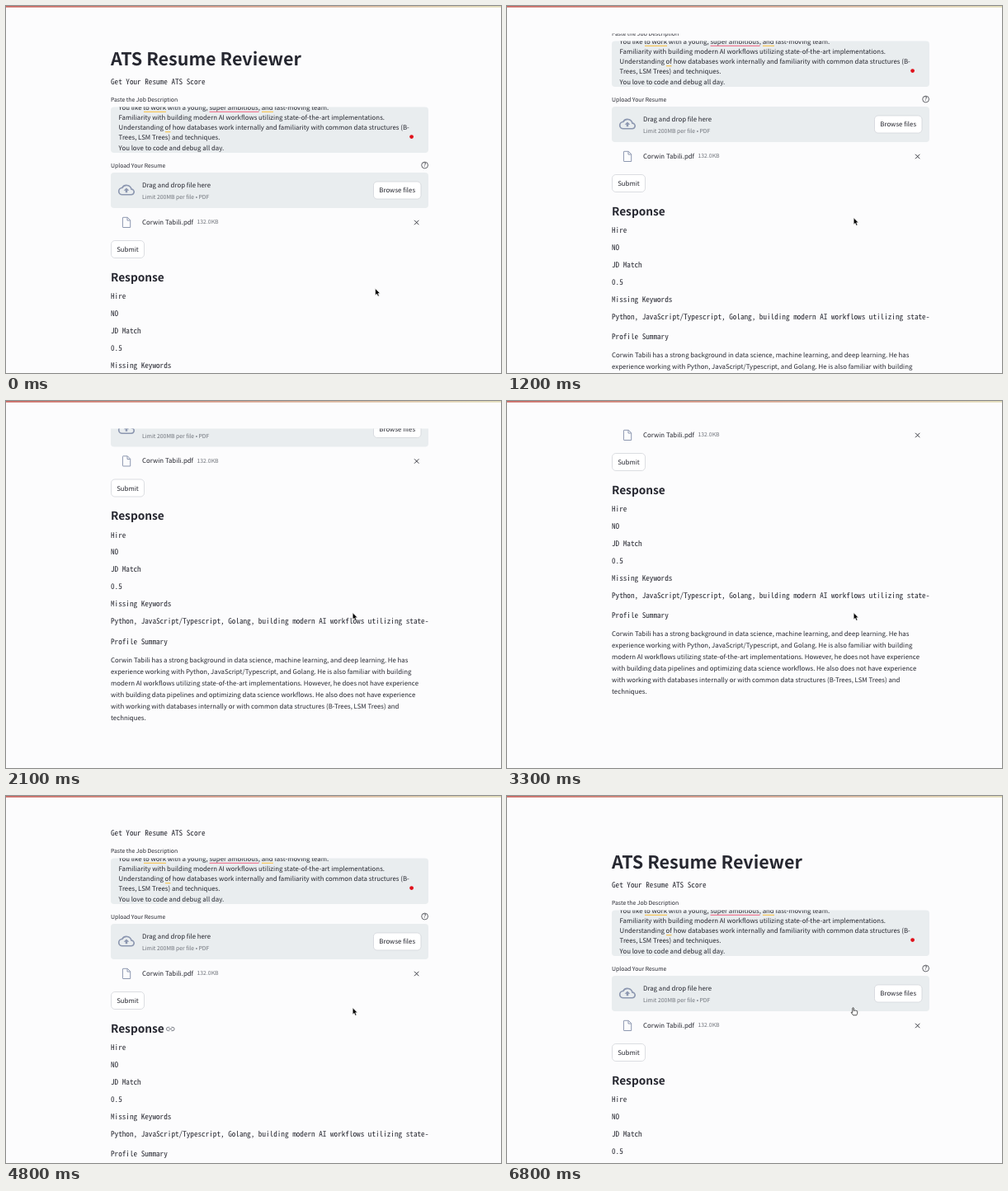
Recreate the animation shown at these times as an HTML page. Size 600 px wide and 445 px high, loop 6.9 s.

```html
<!DOCTYPE html>
<html lang="en">
<head>
<meta charset="utf-8">
<title>ATS Resume Reviewer</title>
<style>
html, body { margin: 0; height: 100%; overflow: hidden; background: #fcfcfd; }
svg { display: block; width: 600px; height: 445px; }
text { font: 7.83px "Noto Sans CJK JP", "Noto Sans", sans-serif; fill: #262730; text-rendering: geometricPrecision; white-space: pre; }
.h1 { font-size: 21.5px; font-weight: 700; }
.h2 { font-size: 13.7px; font-weight: 700; }
.small { font-size: 6.86px; }
.grey { font-size: 6.86px; fill: #70747c; }
.mid { text-anchor: middle; }
.mono { font: 9.18px "Noto Sans Mono CJK JP", "Noto Sans Mono", monospace; }
.box { fill: #e9edef; }
.btn { fill: #fff; stroke: #cdd0d6; stroke-width: .7; }
.line { fill: none; stroke: #262730; stroke-width: .9; }
.icon { fill: none; stroke: #8c97b0; }
</style>
</head>
<body>
<svg viewBox="0 0 600 445">
  <defs>
    <linearGradient id="bar"><stop stop-color="#c9655f"/><stop offset="1" stop-color="#e2dcb8"/></linearGradient>
    <clipPath id="view"><path d="M0 33.5H600V445H0z"/></clipPath>
    <clipPath id="area"><rect x="127" y="122.5" width="385" height="55.5" rx="4"/></clipPath>
  </defs>
  <rect width="600" height="1.7" fill="url(#bar)"/>
  <g clip-path="url(#view)"><g id="page">
    <rect class="box" x="127" y="122.5" width="385" height="55.5" rx="4"/>
    <g id="job" clip-path="url(#area)">
      <path d="M167 128.3h27M310 128.3h14M193 152.6h6.5" stroke="#f5c65d" stroke-width="1.2"/>
      <path d="M246.500 128.3h60" stroke="#f07c95" stroke-width="1.2"/>
    </g>
    <circle cx="491.600" cy="158.600" r="2.400" fill="#e0101a"/>
    <circle class="line" cx="507.600" cy="193" r="3.900" style="stroke-width:.7"/>
    <rect class="box" x="127" y="202" width="385" height="43" rx="4"/>
    <g transform="translate(136 213) scale(.83)">
      <path class="icon" stroke-width="2" d="M6 19h13a4 4 0 0 0 .3-8 7.400 7.400 0 0 0-13.600-2A5 5 0 0 0 6 19z"/>
      <path d="M8 13h2.500v3h3v-3H16l-4-4z" fill="#8c97b0"/>
    </g>
    <rect class="btn" x="445.500" y="213" width="57.500" height="21" rx="4.400"/>
    <path class="icon" d="M142 256.300h5.300l3.400 3.400v8.800h-8.700q-.6 0-.6-.6v-11q0-.6.600-.6zM147 256.500v3.500h3.500"/>
    <path class="line" d="M495 259.800l5.400 5.400m0-5.400l-5.400 5.400"/>
    <rect class="btn" x="127.500" y="284.500" width="40" height="21" rx="4.400"/>
    <g id="link" class="icon" style="stroke:#777b84" stroke-width="1">
      <path d="M198.300 327.400h-1.700a2.100 2.100 0 0 0 0 4.200h1.700M200.300 327.400h1.700a2.100 2.100 0 0 1 0 4.200h-1.700M197.300 329.500h4"/>
    </g>
  </g></g>
  <path id="arrow" d="M0 0v8.200l1.900-1.700 1.300 3 1.500-.7-1.300-2.900h2.500z" fill="#000" stroke="#fff" stroke-width=".6"/>
  <path id="hand" transform="translate(420.300 256.300)" fill="#fff" stroke="#222" stroke-width=".8" stroke-linejoin="round"
    d="M-1.500.8q.7-1 1.500 0v3.200q.7-.8 1.500 0 .8-.7 1.500.2 1.300-.3 1.400.8v2q-.3 1.300-1 2.500h-4L-3 6.500q-.3-1.400 1.500-.3z"/>
</svg>
<script>
const $ = id => document.getElementById(id);

function write(x, y, str, cls = "", parent = $("page")) {
  const el = document.createElementNS("http://www.w3.org/2000/svg", "text");
  el.setAttribute("x", x);
  el.setAttribute("y", y);
  el.setAttribute("class", cls);
  el.textContent = str;
  parent.append(el);
}

write(127, 71.5, "ATS Resume Reviewer", "h1");
write(127, 95.2, "Get Your Resume ATS Score", "mono");
write(127, 116.2, "Paste the Job Description", "small");
[
  "You like to work with a young, super ambitious, and fast-moving team.",
  "Familiarity with building modern AI workflows utilizing state-of-the-art implementations.",
  "Understanding of how databases work internally and familiarity with common data structures (B-",
  "Trees, LSM Trees) and techniques.",
  "You love to code and debug all day."
].forEach((s, i) => write(136.6, 125.7 + 12.25 * i, s, "", $("job")));
write(127, 195.5, "Upload Your Resume", "small");
write(507.6, 195.4, "?", "small mid");
write(165, 220.2, "Drag and drop file here");
write(165, 234, "Limit 200MB per file • PDF", "grey");
write(474.2, 226.2, "Browse files", "mid");
write(165, 264.6, "Corwin Tabili.pdf");
write(231.5, 264.4, "132.0KB", "grey");
write(147.5, 298, "Submit", "mid");
write(127, 333.6, "Response", "h2");
[
  "Hire", "NO", "JD Match", "0.5", "Missing Keywords",
  "Python, JavaScript/Typescript, Golang, building modern AI workflows utilizing state-"
].forEach((s, i) => write(127, 355 + 20.95 * i, s, "mono"));
write(127, 484, "Profile Summary", "mono");
[
  "Corwin Tabili has a strong background in data science, machine learning, and deep learning. He has",
  "experience working with Python, JavaScript/Typescript, and Golang. He is also familiar with building",
  "modern AI workflows utilizing state-of-the-art implementations. However, he does not have experience",
  "with building data pipelines and optimizing data science workflows. He also does not have experience",
  "with working with databases internally or with common data structures (B-Trees, LSM Trees) and",
  "techniques."
].forEach((s, i) => write(127, 506 + 14 * i, s));

// [time, page offset]
const scroll = [[500, 0], [1200, -80], [1900, -160], [2100, -189.5], [2400, -221.5], [3200, -221.5],
  [3300, -221], [3900, -156], [4200, -133], [4800, -47], [5100, -20], [5400, 0], [5700, 11], [6000, 16]];

function offset(t) {
  const i = scroll.findIndex(p => p[0] > t);
  if (i === 0) return 0;
  if (i < 0) return 16;
  const [a, y] = scroll[i - 1], [b, z] = scroll[i];
  return y + (z - y) * (t - a) / (b - a);
}

const show = (id, on) => $(id).style.display = on ? "" : "none";

function draw(now) {
  const t = Math.floor((now % 6900 + .5) / 100) * 100; // ten steps a second
  const k = Math.min(t / 200, 1);
  $("page").setAttribute("transform", `translate(0 ${offset(t)})`);
  $("arrow").setAttribute("transform", `translate(${447.6 - 27.4 * k} ${342.6 - 85.8 * k})`);
  show("link", t >= 4600 && t < 4900);
  show("hand", t >= 5800);
  show("arrow", t < 5800);
}

const start = performance.now();
(function loop() {
  draw(performance.now() - start);
  requestAnimationFrame(loop);
})();
</script>
</body>
</html>
```
